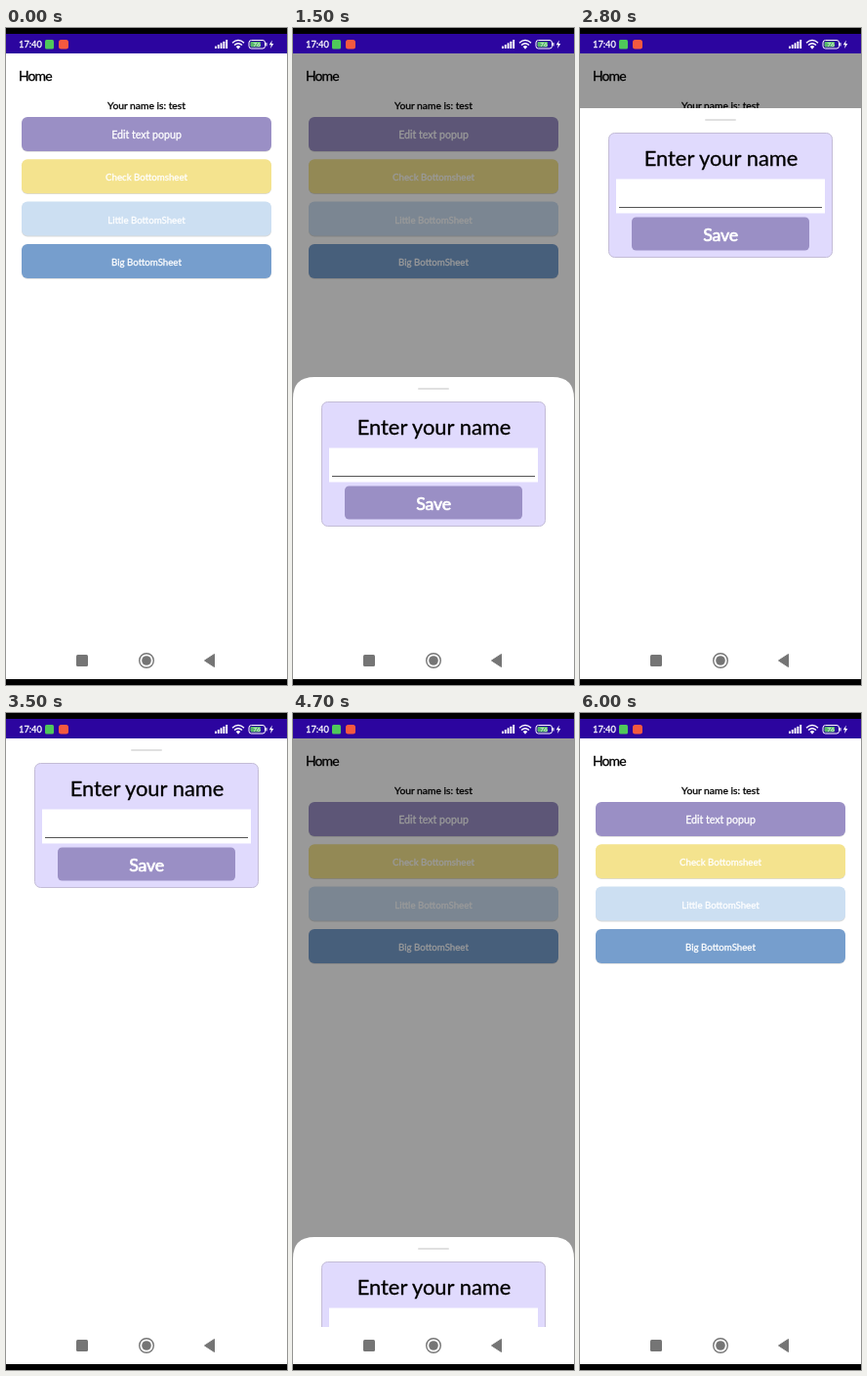
An HTML page that plays this animation: 288 px wide and 672 px high, repeating every 6400 ms.

```html
<!DOCTYPE html>
<html lang="en">
<head>
<meta charset="utf-8">
<title>Bottom sheet demo</title>
<style>
  html, body { margin: 0; width: 100%; height: 100%; overflow: hidden; background: #fff; }
  svg { display: block; width: 288px; height: 672px; }
  text { font-family: Lato, "Open Sans", sans-serif; stroke-linejoin: round; }
  .mid { text-anchor: middle; }
  .dark { fill: #000; stroke: #000; stroke-width: .3; }
  .light { fill: #fff; stroke: #fff; stroke-width: .3; }
</style>
</head>
<body>
<svg viewBox="0 0 288 672">
  <rect width="288" height="672" fill="#fff"/>

  <g id="home">
    <text class="dark" x="13" y="54" font-size="14" letter-spacing="-.9">Home</text>
    <text class="dark mid" x="144" y="83" font-size="10.3">Your name is: test</text>
  </g>

  <rect id="dim" y="26" width="288" height="602" opacity="0"/>

  <g id="sheet">
    <path id="panel" fill="#fff"/>
    <rect x="128" y="11" width="32" height="2" rx="1" fill="#e0e0e0"/>
    <rect x="29.5" y="25.5" width="229" height="127" rx="6" fill="#e0dafd" stroke="#c3bcd6"/>
    <text class="dark mid" x="144.5" y="59" font-size="21.9" stroke-width=".5">Enter your name</text>
    <rect x="37" y="72.5" width="214" height="35" fill="#fff"/>
    <rect id="underline" x="40" y="101" width="208" height="1" fill="#555"/>
    <rect x="53" y="111.5" width="182" height="34" rx="4.5" fill="#9a8fc5"/>
    <text class="light mid" x="144" y="135.5" font-size="17.8" letter-spacing="-.2" style="stroke-width:.7">Save</text>
  </g>

  <g id="nav">
    <rect y="628" width="288" height="38" fill="#fff"/>
    <rect x="72" y="641" width="12" height="12" rx="1.5" fill="#757575"/>
    <circle cx="144" cy="647" r="7.3" fill="none" stroke="#757575" stroke-width="1.4"/>
    <circle cx="144" cy="647" r="4.8" fill="#757575"/>
    <path d="M203.5 647L213.5 640.5V653.5Z" fill="#757575" stroke="#757575" stroke-linejoin="round"/>
    <rect y="666" width="288" height="6"/>
  </g>

  <g id="status">
    <rect width="288" height="26" fill="#2c059f"/>
    <rect width="288" height="6"/>
    <text class="light" x="13" y="20.3" font-size="9.3">17:40</text>
    <rect x="40" y="12" width="9" height="9.5" rx="1.5" fill="#4fc85a"/>
    <rect x="54" y="12" width="10" height="9.5" rx="2.5" fill="#f4593f"/>
    <g id="bars" fill="#fff"></g>
    <g fill="none" stroke="#fff" stroke-width="1.4">
      <path d="M232 15.2Q238 9.8 244 15.2"/>
      <path d="M234 17.5Q238 13.8 242 17.5"/>
    </g>
    <path d="M235.7 19Q238 17 240.3 19L238 21.7Z" fill="#fff"/>
    <rect x="249" y="12.5" width="16.5" height="8.5" rx="2.5" fill="none" stroke="#fff"/>
    <rect x="250.5" y="14" width="10.5" height="5.5" rx="1" fill="#58b86a"/>
    <rect x="266.3" y="15" width="1.2" height="3.5" rx=".6" fill="#fff"/>
    <text class="mid" x="257" y="19.3" font-size="6.5" fill="#fff">76</text>
    <path d="M272.8 12.5L269.8 17.3H271.8L271 21L274.3 16H272.2Z" fill="#fff"/>
  </g>
</svg>

<script>
const LOOP = 6400, STEP = 100, HIDDEN = 628, RADIUS = 22;
const $ = id => document.getElementById(id);

function add(parent, tag, attrs, label = "") {
  const el = document.createElementNS("http://www.w3.org/2000/svg", tag);
  for (const key in attrs) el.setAttribute(key, attrs[key]);
  el.textContent = label;
  parent.appendChild(el);
}

const buttons = [
  ["Edit text popup", "#9a8fc5", 10.6],
  ["Check Bottomsheet", "#f4e38e", 9.7],
  ["Little BottomSheet", "#ccdff2", 9.7],
  ["Big BottomSheet", "#769ecd", 9.7]
];
buttons.forEach(([label, fill, size], i) => {
  const y = 91 + i * 43.3;
  const box = { x: 16, width: 256, height: 35, rx: 6 };
  add($("home"), "rect", { ...box, y: y + .8, fill: "#000", opacity: .15 });
  add($("home"), "rect", { ...box, y, fill });
  add($("home"), "text", { class: "light mid", x: 144, y: y + 22, "font-size": size }, label);
});

for (let i = 0; i < 5; i++) {
  const h = 2.5 + i * 1.6;
  add($("bars"), "rect", { x: 214 + i * 2.8, y: 21 - h, width: 1.9, height: h, rx: .5 });
}

const clamp = v => Math.min(1, Math.max(0, v));
const ramp = (t, a, b) => clamp((t - a) / (b - a));
const easeOut = n => x => 1 - (1 - x) ** n;
const sine = x => (1 - Math.cos(Math.PI * x)) / 2;

// start, end, target top of the sheet, easing
const moves = [
  [50, 1000, 405, easeOut(2.8)],
  [1330, 1950, 130, sine],
  [1950, 2700, 345, sine],
  [2700, 3040, 26, easeOut(5)],
  [3650, 4700, 536, easeOut(2.18)],
  [4700, 5050, 405, easeOut(5)],
  [5350, 5950, HIDDEN, sine]
];

function sheetTop(t) {
  let y = HIDDEN;
  for (const [start, end, to, ease] of moves) {
    if (t < start) break;
    y += (to - y) * ease(ramp(t, start, end));
  }
  return y;
}

function draw(t) {
  const y = sheetTop(t);
  const r = RADIUS * (1 - ramp(t, 2700, 2800) + ramp(t, 3650, 3800));
  $("sheet").setAttribute("transform", `translate(0 ${Math.round(y)})`);
  $("panel").setAttribute("d",
    `M0 ${r}Q0 0 ${r} 0H${288 - r}Q288 0 288 ${r}V650H0Z`);
  $("dim").setAttribute("opacity", .4 * (ramp(t, 50, 450) - ramp(t, 5350, 5950)));
  $("underline").setAttribute("visibility", t >= 4000 && t < 4100 ? "hidden" : "visible");
}

function tick() {
  const t = performance.now() % LOOP;
  draw(Math.floor(t / STEP) * STEP);
  requestAnimationFrame(tick);
}
tick();
</script>
</body>
</html>
```
